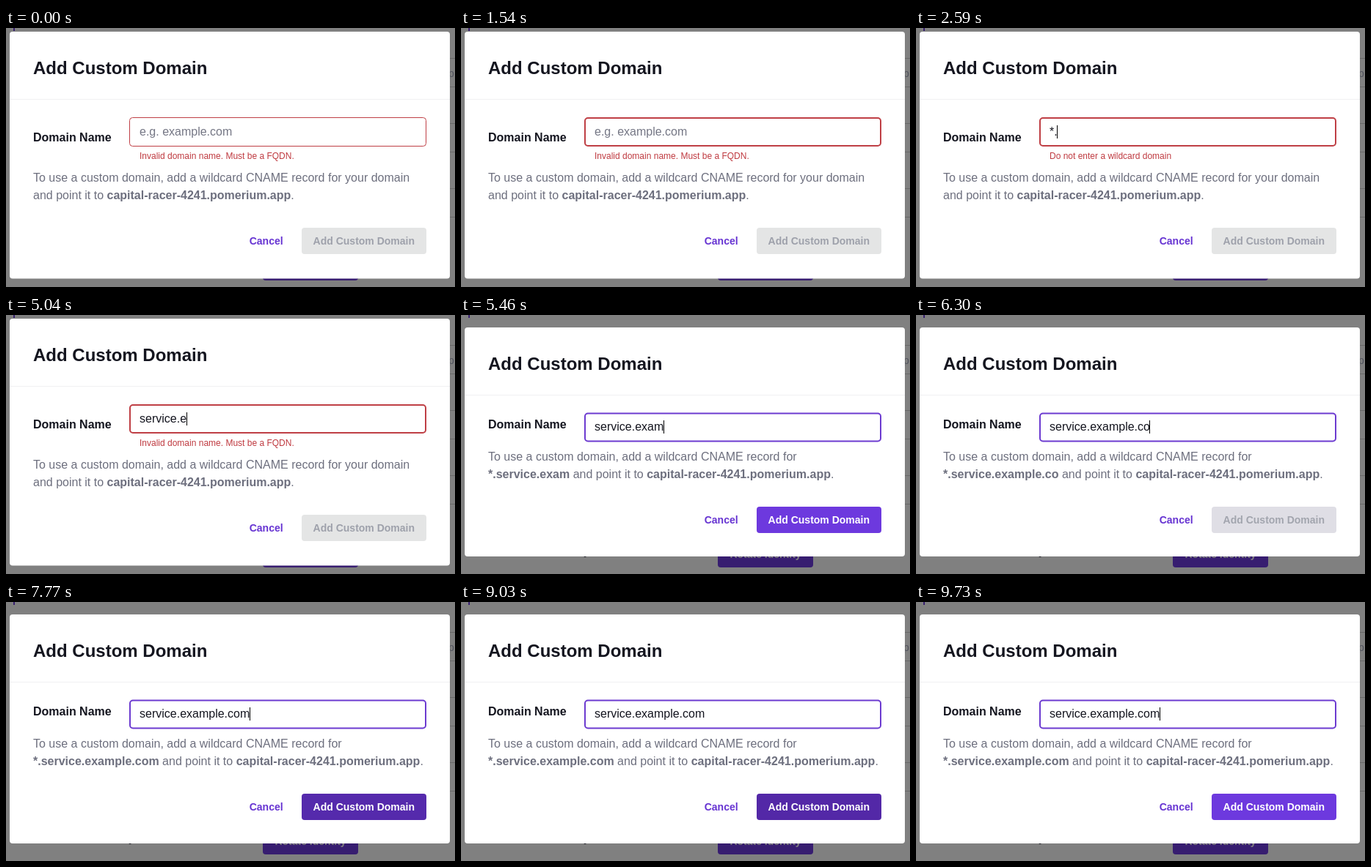
An HTML page for the animation above (9.94 s loop, 612 by 354 pixels).

```html
<!DOCTYPE html>
<html lang="en">
<head>
<meta charset="utf-8">
<title>Add Custom Domain</title>
<style>
  html, body { margin: 0; width: 100%; height: 100%; overflow: hidden; background: #808080; }
  svg { display: block; font: 16px "Liberation Sans", Arial, sans-serif; }
  .b { font-weight: bold; }
  .s { font-size: 14px; }
  .ink { fill: #14151f; }
  .grey { fill: #6d6f7e; }
  .err { fill: #bf3a40; font-size: 12px; }
</style>
</head>
<body>
<svg width="612" height="354" viewBox="0 0 612 354">
  <!-- dimmed page -->
  <rect width="612" height="354" fill="#808080"/>
  <rect x="10" width="2" height="4" fill="#382070"/>
  <path d="M600 41.5h12M600 80.5h12M600 130.5h12M600 169.5h12M600 219.5h12M600 258.5h12" stroke="#686868"/>
  <text x="603" y="67" class="s" fill="#50525c">p</text>
  <text x="167" y="328" class="s b" fill="#14151c">y</text>
  <rect x="350" y="309" width="130" height="36" rx="4" fill="#371d70"/>
  <text x="366.4" y="332" class="s b" fill="#808080">Rotate Identity</text>

  <!-- dialog -->
  <rect id="panel" x="5" width="600" rx="4" fill="#fff"/>
  <g id="head">
    <text x="37" y="63" class="b ink" font-size="24">Add Custom Domain</text>
    <path d="M5 97.5h600" stroke="#f0f0f2"/>
  </g>
  <text x="37" y="155" class="b ink">Domain Name</text>
  <rect id="box" fill="none" rx="4"/>
  <g id="field">
    <text id="value" x="182" y="147"></text>
    <rect id="caret" y="133" width="1" height="18" fill="#000"/>
  </g>
  <text id="error" x="182" y="179" class="err"></text>
  <g id="help" class="grey">
    <text x="37" y="210">To use a custom domain, add a wildcard CNAME record for <tspan id="tail"></tspan></text>
    <text x="37" y="234"><tspan id="lead" class="b"></tspan>and point it to <tspan class="b">capital-racer-4241.pomerium.app</tspan>.</text>
  </g>
  <g id="foot" class="s b">
    <text x="331.7" y="296" fill="#6734d2">Cancel</text>
    <rect id="button" x="403" y="273" width="170" height="36" rx="4"/>
    <text id="label" x="418.6" y="296">Add Custom Domain</text>
  </g>
</svg>
<script>
const LOOP = 9940, STEP = 70;
const $ = id => document.getElementById(id);
const set = (id, attrs) => {
  for (const k in attrs) $(id).setAttribute(k, attrs[k]);
};
const write = (id, s) => { $(id).textContent = s; };
const shift = (id, y) => set(id, { transform: `translate(0 ${y})` });

// moment of each key press and the last character then in the field
const DELETE = '<';
const keys = [
  [2240, '*'], [2590, '.'], [3290, DELETE], [3430, DELETE],
  [3710, 's'], [3850, 'e'], [3990, 'r'], [4130, 'v'], [4270, 'i'], [4480, 'c'], [4620, 'e'],
  [4760, '.'], [5040, 'e'], [5250, 'x'], [5390, 'a'], [5460, 'm'], [5600, 'p'], [5740, 'l'],
  [5880, 'e'], [6020, '.'], [6160, 'c'], [6300, 'o'], [6440, 'm']
];
const caretOff = [[0, 980], [1540, 2030], [3150, 3290], [6930, 7490], [7980, 8540], [9030, 9590]];

const GREY = [228, 229, 229], PURPLE = [109, 57, 222], DARK = [83, 40, 167];
const FADED = [158, 161, 171], WHITE = [255, 255, 255];
const mix = (a, b, p) => `rgb(${a.map((v, i) => Math.round(v + (b[i] - v) * p))})`;

// cubic-bezier(.4, 0, .2, 1) over 250 ms
function fade(t, start) {
  const x = Math.min(1, Math.max(0, (t - start) / 250));
  let lo = 0, hi = 1;
  for (let i = 0; i < 20; i++) {
    const u = (lo + hi) / 2, v = 1 - u;
    if (1.2 * u * v * v + 0.6 * u * u * v + u ** 3 < x) lo = u; else hi = u;
  }
  return lo * lo * (3 - 2 * lo);
}

function typed(t) {
  let s = '';
  for (const [at, c] of keys) {
    if (at <= t) s = c === DELETE ? s.slice(0, -1) : s + c;
  }
  return s;
}

function draw(t) {
  const s = typed(t);
  const valid = /^\w+(\.\w+)*\.\w{2,}$/.test(s);
  const focus = t >= 980;

  set('panel', valid ? { y: 17, height: 313 } : { y: 5, height: 337.5 });
  shift('head', valid ? 12 : 0);
  shift('field', valid ? 11 : 0);
  shift('help', valid ? -11 : 0);
  shift('foot', valid ? -11 : 0);

  const inset = focus ? 1 : 0.5;
  set('box', {
    x: 168 + inset, y: (valid ? 133.5 : 122) + inset,
    width: 405 - 2 * inset, height: 40 - 2 * inset,
    'stroke-width': 2 * inset, stroke: valid ? '#6c3bd0' : '#bf3f45'
  });

  write('value', s || 'e.g. example.com');
  set('value', { fill: s ? '#14151f' : '#757785' });
  const width = s ? $('value').getComputedTextLength() : 0;
  const hidden = caretOff.some(([a, b]) => t >= a && t < b);
  set('caret', { x: Math.floor(182 + width), opacity: hidden ? 0 : 1 });

  write('error', valid ? '' : s[0] === '*' ? 'Do not enter a wildcard domain' : 'Invalid domain name. Must be a FQDN.');

  // a short domain still fits on the first line
  const name = '*.' + s, fits = s.length < 12;
  write('tail', !valid ? 'your domain' : fits ? name : '');
  set('tail', { class: valid ? 'b' : '' });
  write('lead', valid && !fits ? name + '\u00a0' : '');

  const on = fade(t, 5220) - fade(t, 5990) + fade(t, 6270);
  const hover = fade(t, 7610) - fade(t, 9400);
  set('button', { fill: hover > 0 ? mix(PURPLE, DARK, hover) : mix(GREY, PURPLE, on) });
  set('label', { fill: mix(FADED, WHITE, on) });
}

const begin = performance.now();
function tick() {
  const t = (performance.now() - begin) % LOOP;
  draw(Math.floor(t / STEP) * STEP);
  requestAnimationFrame(tick);
}
tick();
</script>
</body>
</html>
```
